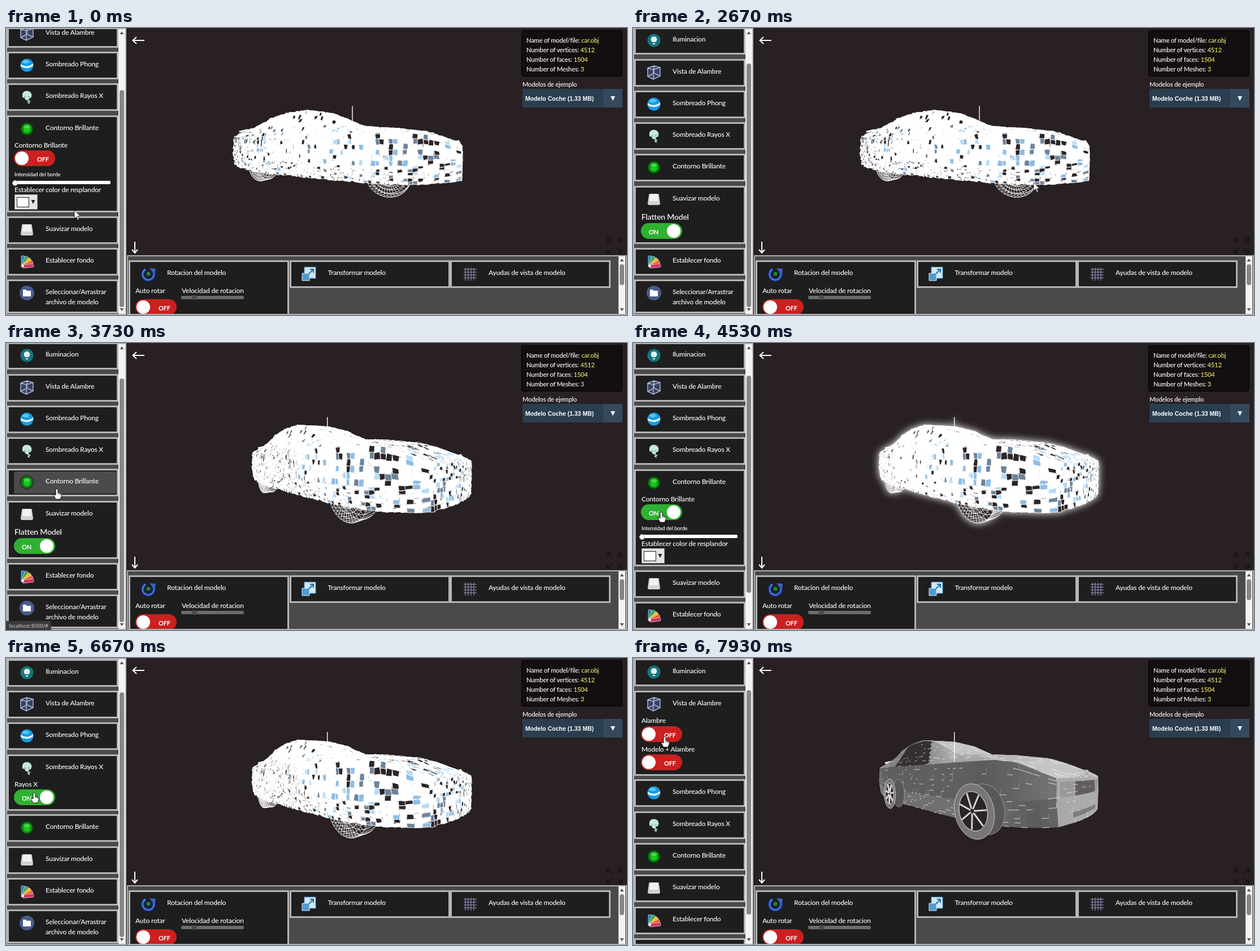
These frames come from a looping animation (1099 by 509 pixels, 8 s). An HTML page with a canvas:

```html
<!DOCTYPE html>
<html lang="es">
<head>
<meta charset="utf-8">
<title>Visor de modelos</title>
<style>
html, body { margin: 0; width: 100%; height: 100%; overflow: hidden; background: #282022; }
#stage { position: relative; width: 1099px; height: 509px; overflow: hidden; }
#stage * { position: absolute; box-sizing: border-box; }
#stage span span { position: static; }
.txt { white-space: pre; line-height: 1; transform: translateY(-50%); color: #fff;
  font-family: Lato, "Open Sans", sans-serif; font-weight: 500; letter-spacing: -.2px; }
.frame { background: #4a4a4c; border: 2px solid #b0b0b0; overflow: hidden; }
.panel { background: #1e1e1e; border: 3px solid #b5b5b5; overflow: hidden; }
.inner { left: -3px; top: -3px; }
.hover { left: 12px; top: 5px; width: 181px; height: 39px; background: #4b4b4d; }
.toggle { width: 73px; height: 28px; border-radius: 14px; }
.knob { top: 2px; width: 24px; height: 24px; border-radius: 50%; background: #fff; }
.bar { background: #f3f3f3; }
.thumb { left: 2px; width: 8px; background: #868686; border-radius: 4px; }
svg { overflow: visible; left: 0; top: 0; }
</style>
</head>
<body>
<div id="stage"></div>
<script>
const LOOP = 8000;
const stage = document.getElementById('stage');

// ---------- small helpers ----------
const lerp = (a, b, k) => a + (b - a) * k;
const ramp = (t, start, length) => Math.min(1, Math.max(0, (t - start) / length));
const swing = u => u * u * (3 - 2 * u);
const ease = u => 1 - (1 - u) ** 2.2 * (1 - .35 * u * (1 - u));

function el(parent, tag, cls, css, html) {
  const e = document.createElement(tag);
  e.className = cls;
  Object.assign(e.style, css);
  if (html) e.innerHTML = html;
  parent.append(e);
  return e;
}
const box = (x, y, w, h) => ({ left: x + 'px', top: y + 'px', width: w + 'px', height: h + 'px' });
const block = (p, x, y, w, h, css) => el(p, 'div', '', { ...box(x, y, w, h), ...css });
const text = (p, x, y, str, size = 12, css = {}) =>
  el(p, 'span', 'txt', { left: x + 'px', top: y + 'px', fontSize: size + 'px', ...css }, str);
const svg = (p, x, y, body) =>
  el(p, 'div', '', { left: x + 'px', top: y + 'px' }, `<svg width="1" height="1">${body}</svg>`);

// ---------- icons, centred on 0,0 ----------
const fanColors = ['#2d7fc4', '#35a548', '#f0b92d', '#e8632f', '#cf3565'];
const icons = {
  bulb: '<circle r="11.5" fill="#17757c"/><path d="M-3 3C-8-2-4-7 0-7S8-2 3 3ZM-2 5h4v2h-4Z" fill="#e4f4f2"/>',
  cube: '<path d="M-11-8L0-12 11-9V6L-1 12-11 7Z" fill="#39415f"/><path d="M-11-8L0-12 11-9V6L-1 12-11 7ZM-11-8L-1-5 11-9M-1-5V12M0-12V1L11 6M0 1L-11 7" fill="none" stroke="#a9b6d6" stroke-width="1.5"/>',
  ball: '<circle r="11.5" fill="#169be0"/><path d="M-11-2Q0 6 11-3L11 1Q0 9-11 2Z" fill="#e8f7ff"/><ellipse cx="-2" cy="-6" rx="6" ry="3" fill="#5cc4f5"/>',
  skull: '<path d="M-8-2C-9-9-2-12 3-10S10-3 7 2L4 3 2 7-3 5-4 2-8 1Z" fill="#c6e6e0"/><path d="M-5-1l4 1-2 2ZM2-1l3 0-2 3Z" fill="#6f9f9b"/><path d="M1 6L5 8 2 10 5 12" fill="none" stroke="#a9d4ce" stroke-width="2"/>',
  glow: '<circle r="13" fill="#0a3a0c" opacity=".6"/><circle r="10" fill="#0b8a10"/><circle r="6" cy="1" fill="#17c91b"/><ellipse cy="-4" rx="6" ry="3" fill="#5fe45f" opacity=".7"/>',
  pillow: '<path d="M-7-10H7Q9-10 9-7L11 7Q11 10 8 10H-8Q-11 10-11 7L-9-7Q-9-10-7-10Z" fill="#d2d2d0"/><path d="M-7-9H7L8 3H-8Z" fill="#f1f1ef"/>',
  fan: fanColors.map((c, i) => `<rect x="-3" y="-19" width="6" height="20" rx="1.5" fill="${c}" stroke="#eee" stroke-width=".6" transform="translate(-7 9) rotate(${i * 21})"/>`).join('') + '<circle cx="-7" cy="8" r="2" fill="#fff"/>',
  folder: '<circle r="13" fill="#4a5a8c"/><path d="M-7-6H-2L0-4H7V6H-7Z" fill="#fff"/>',
  spin: '<path d="M-5-8A10 10 0 1 0 8-5" fill="none" stroke="#16308f" stroke-width="6"/><path d="M-5-8A10 10 0 1 0 8-5" fill="none" stroke="#5b86dd" stroke-width="2"/><path d="M2-10L13-9 11 2Z" fill="#3a63c4"/><circle r="3.5" fill="#1c8a38"/>',
  scale: '<path d="M-8-12H12V8H-8Z" fill="#cfe6f5" stroke="#4f97c8"/><path d="M-12-1H1V12H-12Z" fill="#4b9bd3" stroke="#dceefa"/><path d="M0 0L8-8M2-8H8V-2" fill="none" stroke="#1f6fa8" stroke-width="2"/>',
  grid: '<path d="' + [-8, -3, 2, 7].map(v => `M${v}-11V12M-11 ${v}H12`).join('') + '" stroke="#7d7796" stroke-width="1.5"/>'
};

// ---------- viewer overlay ----------
const canvas = el(stage, 'canvas', '', { left: 0, top: 0 });
canvas.width = 1099;
canvas.height = 509;
const g = canvas.getContext('2d');

svg(stage, 0, 0, '<path d="M245 22H225M231 16L224.500 22 231 28M228 379V398M223 393L228 399 233 393" fill="none" stroke="#fff" stroke-width="2"/>');
for (const sx of [-1, 1]) for (const sy of [-1, 1])
  svg(stage, 1076.5 + sx * 13, 386 + sy * 13,
    `<path d="M${-7 * sx} 0H0V${-7 * sy}M0 0L${-8 * sx} ${-8 * sy}" fill="none" stroke="#191415" stroke-width="2.200"/>`);

block(stage, 912, 4, 179, 82, { background: '#130f10', border: '1px solid #000', borderRadius: '4px' });
Object.entries({ 'Name of model/file': 'car.obj', 'Number of vertices': 4512, 'Number of faces': 1504, 'Number of Meshes': 3 })
  .forEach(([k, v], i) => text(stage, 921, 22 + i * 17, `${k}: <span style="color:#f4ea72">${v}</span>`, 11.2));
text(stage, 914, 100, 'Modelos de ejemplo', 11.2);
block(stage, 914, 108, 177, 33, { background: '#2b3e50' });
block(stage, 1057, 108, 34, 33, { background: '#34495e' });
text(stage, 919, 124.5, 'Modelo Coche (1.33 MB)', 10.5,
  { font: 'bold 10.5px/1 "Liberation Sans", Arial, sans-serif', letterSpacing: 0 });
svg(stage, 1074, 125, '<path d="M-4-4H4L0 4Z" fill="#fff"/>');

// ---------- widgets ----------
function toggle(p, x, y) {
  const e = el(p, 'div', 'toggle', { left: x + 'px', top: y + 'px' });
  const knob = el(e, 'div', 'knob', {});
  const label = text(e, 0, 14.5, '', 11, { fontWeight: 700 });
  const set = on => {
    e.style.background = on ? '#2fb131' : '#cb2020';
    knob.style.left = (on ? 46 : 2) + 'px';
    label.style.left = (on ? 14 : 41) + 'px';
    label.textContent = on ? 'ON' : 'OFF';
  };
  set(false);
  return { y, set };
}
function panel(p, x, y, w, h, icon, title) {
  const e = el(p, 'div', 'panel', box(x, y, w, h));
  const inner = el(e, 'div', 'inner', {});
  const hover = el(inner, 'div', 'hover', {});
  hover.hidden = true;
  if (icon) svg(inner, 34.5, 24, icons[icon]);
  title.split('|').forEach((s, i) => text(inner, 68, 21.5 + i * 18.5, s));
  return { e, inner, hover, h, switches: [] };
}
function addSwitch(p, y) {
  const s = toggle(p.inner, 12, y);
  p.switches.push(s);
  return s;
}
function scrollbar(p, x, h) {
  const e = el(p, 'div', 'bar', box(x, 0, 12, h));
  svg(e, 6, 7, '<path d="M-3.500 2H3.500L0-3Z" fill="#555"/>');
  svg(e, 6, h - 8, '<path d="M-3.500-2H3.500L0 3Z" fill="#555"/>');
  return el(e, 'div', 'thumb', {});
}

// ---------- sidebar ----------
const side = el(stage, 'div', 'frame', box(0, 0, 213, 509));
const titles = { bulb: 'Iluminacion', cube: 'Vista de Alambre', ball: 'Sombreado Phong', skull: 'Sombreado Rayos X',
  glow: 'Contorno Brillante', pillow: 'Suavizar modelo', fan: 'Establecer fondo', folder: 'Seleccionar/Arrastrar|archivo de modelo' };
const list = [['', ''], ...Object.entries(titles)]
  .map(([icon, title]) => panel(side, 0, 0, 197, icon === 'folder' ? 60 : 49, icon, title));
const [, , wire, , xray, glow, smooth] = list;

text(wire.inner, 13, 53, 'Alambre');
const wireSwitch = addSwitch(wire, 63);
text(wire.inner, 13, 104, 'Modelo + Alambre');
addSwitch(wire, 113);
text(xray.inner, 13, 53, 'Rayos X');
const xraySwitch = addSwitch(xray, 62);
text(glow.inner, 13, 53, 'Contorno Brillante');
const glowSwitch = addSwitch(glow, 62);
text(glow.inner, 13, 105, 'Intensidad del borde', 9.5);
block(glow.inner, 12, 116, 171, 6, { background: '#fff', borderRadius: '2px' });
block(glow.inner, 9, 115, 10, 10, { background: '#fff', border: '1px solid #aaa', borderRadius: '50%' });
text(glow.inner, 13, 132, 'Establecer color de resplandor');
block(glow.inner, 13, 140, 41, 27, { background: '#e4e4e4', border: '1px solid #999' });
block(glow.inner, 17, 145, 22, 18, { background: '#fff', border: '1px solid #222' });
svg(glow.inner, 46, 153, '<path d="M-3.500-3H3.500L0 4Z" fill="#222"/>');
const smoothLabel = text(smooth.inner, 13, 55, '', 14);
const smoothSwitch = addSwitch(smooth, 66);
const sideThumb = scrollbar(side, 197, 505);

// ---------- bottom bar ----------
const bottom = el(stage, 'div', 'frame', box(214, 403, 885, 106));
const [spin] = ['spin', 'scale', 'grid'].map((icon, i) => panel(bottom, 1 + i * 284.5, 7, 284, i ? 49 : 120, icon,
  ['Rotacion del modelo', 'Transformar modelo', 'Ayudas de vista de modelo'][i]));
text(spin.inner, 12, 54, 'Auto rotar');
text(spin.inner, 94, 54, 'Velocidad de rotacion');
block(spin.inner, 93, 63, 111, 6, { background: '#6c6c6c', borderRadius: '2px' });
block(spin.inner, 112, 62, 9, 8, { background: '#4c4c4c', borderRadius: '3px' });
toggle(spin.inner, 12, 69);
Object.assign(scrollbar(bottom, 868, 102).style, { top: '14px', height: '37px' });

const status = block(stage, 0, 493, 80, 16, { background: '#3a3a3c', borderTopRightRadius: '4px' });
text(status, 5, 8, 'localhost:8000/#', 9, { fontFamily: '"Open Sans", sans-serif', letterSpacing: 0, color: '#ddd' });

const arrow = svg(stage, 0, 0, '<path d="M0 0V15L3.500 11.500 6 17.500 8.300 16.500 5.800 10.800H10.500Z" fill="#fff" stroke="#111" stroke-width=".8"/>');
const hand = svg(stage, 0, 0, '<path d="M-2 1Q0-2 2 1V6L8 8Q9 9 8 13L6 18H-2L-6 11Q-6 8-2 11Z" fill="#fff" stroke="#111"/><path d="M2 6V10M4.500 7V10M6.500 8V11" stroke="#111" stroke-width=".7"/>');

// ---------- car: cross-sections along x, seen in perspective ----------
const FOCUS = 330, EYE = .82, HORIZON = 205, TAIL = -2.3, NOSE = 2.36;
const DARK = '#2b2527';
const topLine = [[-2.3, 1.17], [-1.8, 1.25], [-1.3, 1.43], [-.8, 1.53], [-.3, 1.55],
  [.1, 1.48], [.8, 1.17], [1.5, 1.1], [2, 1.02], [2.36, .86]];
let cam, rnd;

function topAt(x) {
  let i = 0;
  while (i < topLine.length - 2 && topLine[i + 1][0] < x) i++;
  const [a, ya] = topLine[i], [b, yb] = topLine[i + 1];
  return lerp(ya, yb, (x - a) / (b - a));
}
// v runs 0..4: sill, flank, belt line, roof edge, centre line
function section(x, v) {
  const r = x / 2.3, w = .9 - .12 * r ** 6, low = .18 + .12 * r ** 4, top = topAt(x);
  const joints = [[.94 * w, low], [w, low + .28], [.98 * w, Math.min(top - .08, .98)], [.62 * w, top - .04], [0, top]];
  const i = Math.min(3, Math.floor(v)), [a, b] = [joints[i], joints[i + 1]];
  return [lerp(a[0], b[0], v - i), lerp(a[1], b[1], v - i)];
}
const flank = sign => (u, v) => {
  const x = lerp(TAIL, NOSE, u), [z, y] = section(x, v * 4);
  return [x, y, sign * z];
};
const nose = (u, v) => {
  const [z, y] = section(NOSE, v * 4), k = 1 - 2 * u;
  return [NOSE + .06 * (1 - k * k), y, k * z];
};
const toView = ([x, y, z]) => [x * cam.c - z * cam.s, y, x * cam.s + z * cam.c];
function project(p) {
  const [x, y, z] = toView(p), s = FOCUS / (cam.distance - z);
  return [cam.x + x * s, HORIZON - (y - EYE) * s];
}
function draw(points, fill, edge, width = 1) {
  g.beginPath();
  points.forEach(p => g.lineTo(...p));
  if (fill) { g.closePath(); g.fillStyle = fill; g.fill(); }
  if (edge) { g.lineWidth = width; g.strokeStyle = edge; g.stroke(); }
}
const line = (points, color, width) => draw(points.map(project), null, color, width);

function patch(surface, nu, nv, paint) {
  for (let i = 0; i < nu; i++) for (let j = 0; j < nv; j++) {
    const at = (a, b) => surface((i + a) / nu, (j + b) / nv);
    paint([at(0, 0), at(1, 0), at(1, 1), at(0, 1)], at(.5, .5), (j + .5) / nv, 1 - 2 * (i + .5) / nu);
  }
}
function paintWire(quad, [x, y]) {
  const gap = y > 1.2 ? .08 : .13 + .33 * (x / 2.3) ** 2;
  const tone = rnd() > gap ? '#fff' : rnd() < .5 ? DARK : ['#6d8399', '#8fbde4', '#b5dbf7'][Math.floor(rnd() * 3)];
  draw(quad.map(p => project(p).map(v => v + (rnd() - .5) * 3)), tone, '#fff', .9);
}
function shade(quad) {
  const [a, b, , d] = quad.map(toView);
  const e = b.map((v, i) => v - a[i]), f = d.map((v, i) => v - a[i]);
  const n = [0, 1, 2].map(i => e[(i + 1) % 3] * f[(i + 2) % 3] - e[(i + 2) % 3] * f[(i + 1) % 3]);
  const lit = Math.abs(.5 * n[0] + .7 * n[1] + .5 * n[2]) / (Math.hypot(...n) || 1);
  const v = Math.round(92 + 115 * lit);
  return `rgb(${v},${v},${v})`;
}
function paintSolid(tone) {
  return (quad, mid, v, k) => {
    const flat = quad.map(project), color = tone(mid, v, Math.abs(k)) || shade(quad);
    draw(flat, color, color, .7);
    const r = rnd();
    if (r < .2) draw(flat.slice(0, r < .14 ? 2 : 3), null, '#f4f4f4', .8);
  };
}
const glass = ([x], v) => v > .52 && v < .74 && x > -1 && x < .4 - (v - .5) * 1.5 ? '#352f31' : null;
const grille = ([, y], v, k) =>
  y > .6 && y < .76 ? (k < .5 ? '#625d5f' : k < .92 ? '#9a9a9a' : null) : y > .36 && y < .45 && k < .55 ? '#807d7e' : null;

const spoke = (x, z, r, a) => [x + Math.cos(a) * r, .34 + Math.sin(a) * r, z];
const circle = (x, z, r) => Array.from({ length: 33 }, (_, i) => spoke(x, z, r, i * Math.PI / 16));
function wheel(x, z, solid) {
  const inside = z - Math.sign(z) * .22;
  if (solid) {
    draw(circle(x, inside, .34).map(project), '#5a5758', '#999');
    draw(circle(x, z, .35).map(project), '#777', '#c4c4c4');
    draw(circle(x, z, .25).map(project), DARK, '#eee');
    for (let i = 0; i < 7; i++) {
      const a = i * Math.PI / 3.5 + .2;
      line([spoke(x, z, .03, a), spoke(x, z, .24, a)], '#d6d6d6', 3);
    }
    return;
  }
  draw(circle(x, z, .34).map(project), DARK);
  for (const side of [inside, z]) for (let r = .1; r < .35; r += .06) line(circle(x, side, r), '#fff', .9);
  for (let a = 0; a < 6.28; a += .16)
    line([spoke(x, z, .1, a), spoke(x, z, .34, a + .1), spoke(x, inside, .34, a + .25)], '#fff', .8);
}
function drawCar(turn, solid) {
  const angle = lerp(27, 49.5, turn) * Math.PI / 180;
  cam = { c: Math.cos(angle), s: Math.sin(angle), distance: lerp(4.25, 4.02, turn), x: lerp(575, 567, turn) };
  let seed = 77;
  rnd = () => (seed = seed * 16807 % 2147483647) / 2147483647;
  g.clearRect(0, 0, 1099, 509);
  const wheels = z => [-1.32, 1.4].forEach(x => wheel(x, z, solid));
  wheels(-.86);
  if (!solid) wheels(.86);
  line([[-2.3, 1.12, .62], [-2.3, 1.18, .4], [-2.3, 1.19, 0]], '#fff', 3);
  const body = solid ? paintSolid(glass) : paintWire;
  patch(flank(-1), 70, 24, body);
  patch(nose, 24, 20, solid ? paintSolid(grille) : paintWire);
  patch(flank(1), 70, 24, body);
  if (solid) wheels(.88);
  line([[.75, 1.02, .62], [.75, 1.5, .62]], '#fff', 1.4);
}

// ---------- timeline ----------
// pointer stops: arrival, travel time, x, y
const stops = [[0, 1, 121, 323], [500, 260, 117, 352], [1130, 250, 131, 390], [1460, 330, 50, 361], [2670, 450, 709, 274],
  [3300, 370, 640, 288], [3720, 380, 90, 259], [4340, 350, 50, 300], [5280, 330, 80, 205], [5480, 80, 79, 225],
  [5800, 250, 50, 239], [7100, 260, 72, 92], [7500, 250, 56, 140]];
const GAP = 7.3, VIEW = 506.4;

function pointerAt(t) {
  let x = 0, y = 0;
  for (const [arrive, travel, px, py] of stops) {
    const k = swing(ramp(t, arrive - travel, travel));
    x = lerp(x, px, k);
    y = lerp(y, py, k);
  }
  return [x, y];
}
// each click opens one section while the one open before closes
function layout(t) {
  const [a, b, c, d] = [820, 3830, 5423, 7260].map(s => ease(ramp(t, s, 350)));
  const extra = new Map([[glow, 123 * (1 - a + b - c)], [smooth, 54 * (a - b)], [xray, 50.5 * (c - d)], [wire, 101.5 * d]]);
  const heights = list.map(p => p.h + (extra.get(p) || 0));
  const total = heights.reduce((sum, h) => sum + h + GAP, -GAP);
  const limit = b ? (c ? 58 - 3 * c : 58) : 127;
  const scroll = Math.min(limit, total - VIEW);
  let y = -scroll;
  const rows = heights.map(h => {
    const row = { y, h };
    y += h + GAP;
    return row;
  });
  return { rows, total, scroll };
}
function headerAt(t) {
  const [x, y] = pointerAt(t);
  if (x < 14 || x > 195) return null;
  const i = layout(t).rows.findIndex(r => y > r.y + 5 && y < r.y + 44);
  return list[i] || null;
}
function overSwitch(x, y, rows) {
  return x > 14 && x < 87 && list.some((p, i) => p.switches.some(s => {
    const top = rows[i].y + s.y;
    return s.y < rows[i].h && y > top && y < top + 28;
  }));
}
let lastView = '';
function renderCar(t) {
  const turn = swing(ramp(t, 2930, 400)), solid = t >= 7600;
  const key = turn + '|' + solid;
  if (key !== lastView) drawCar(turn, solid);
  lastView = key;
}
function render(t) {
  const { rows, total, scroll } = layout(t);
  list.forEach((p, i) => {
    p.e.style.top = Math.round(rows[i].y) - 2 + 'px';
    p.e.style.height = Math.round(rows[i].h) + 'px';
  });
  sideThumb.style.top = 12 + scroll * 481 / total + 'px';
  sideThumb.style.height = VIEW * 481 / total + 'px';

  const [x, y] = pointerAt(t), header = headerAt(t), before = headerAt(t - 80);
  const link = header || overSwitch(x, y, rows);
  arrow.style.transform = hand.style.transform = `translate(${x}px, ${y}px)`;
  arrow.hidden = !!link;
  hand.hidden = !link;
  list.forEach(p => { p.hover.hidden = p !== header && p !== before; });
  status.hidden = ![0, 90, 180, 270, 350].some(lag => headerAt(t - lag));

  const flat = t >= 2070, glowing = t >= 4400 && t < 4900;
  smoothLabel.textContent = flat ? 'Flatten Model' : 'Smooth Model';
  smoothSwitch.set(flat);
  glowSwitch.set(glowing);
  xraySwitch.set(t >= 6000);
  wireSwitch.set(t < 7560);
  canvas.style.filter = glowing ? 'drop-shadow(0 0 7px #fff)' : 'none';
  renderCar(t);
}
const start = performance.now();
function tick(now) {
  render(Math.max(0, now - start) % LOOP);
  requestAnimationFrame(tick);
}
render(0);
requestAnimationFrame(tick);
</script>
</body>
</html>
```
